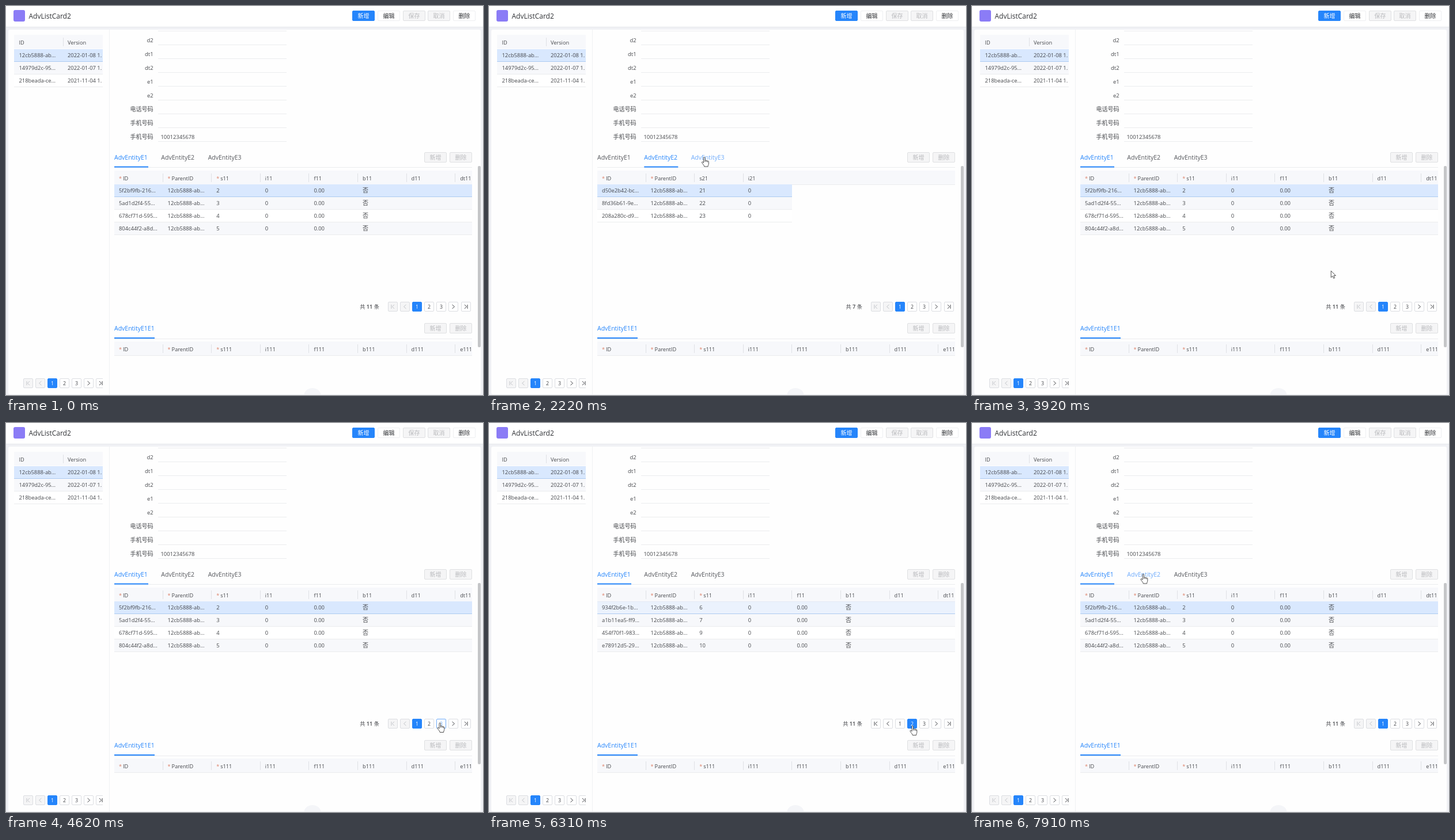
Write an HTML page that moves like this. It is 828 px wide and 676 px high and loops after 8000 ms.

```html
<!DOCTYPE html>
<html>
<head>
<meta charset="utf-8">
<style>
html, body { margin: 0; width: 100%; height: 100%; overflow: hidden; background: #f0f1f5; }
svg { display: block; }
text { font-family: "Open Sans", "Noto Sans CJK SC", "Noto Sans CJK", sans-serif; white-space: pre; }
</style>
</head>
<body>
<svg width="828" height="676" viewBox="0 0 828 676">
  <defs>
    <clipPath id="list"><rect x="14" y="41" width="154" height="634"/></clipPath>
    <clipPath id="grid"><rect x="188" y="280" width="621" height="340"/></clipPath>
    <clipPath id="card"><rect x="4" y="41" width="820" height="634"/></clipPath>
  </defs>
  <g id="back"></g>
  <g id="live"></g>
  <g id="pointer"></g>
</svg>
<script>
const LOOP = 8000, BLUE = '#2585fb', SOFT = '#6eabfb', INK = '#45474b', LINE = '#ebecee', TINT = '#f7f8fb';
const COL = 84.6, TAB_X = [188, 269.3, 350.7], TAB_W = 59;
const $ = id => document.getElementById(id);

const box = (x, y, w, h, fill, more = '') =>
  `<rect x="${x}" y="${y}" width="${w}" height="${h}" fill="${fill}" ${more}/>`;
const text = (x, y, s, size = 9.4, fill = INK, more = '') =>
  `<text x="${x}" y="${y}" font-size="${size}" fill="${fill}" ${more}>${s}</text>`;
const mid = 'text-anchor="middle"', end = 'text-anchor="end"';
const clip = (id, s) => `<g clip-path="url(#${id})">${s}</g>`;

function button(x, y, label, kind) {
  const [fill, edge, ink] = {
    main: [BLUE, BLUE, '#fff'],
    plain: ['#fff', '#eeeff1', '#303236'],
    off: ['#f5f5f6', '#dfe0e2', '#b9babd']
  }[kind];
  return box(x + .5, y + .5, 38, 17, fill, `stroke="${edge}" rx="1.5"`) +
    text(x + 19.5, y + 12.7, label, 10, ink, mid);
}

const selected = (x, y, w, alpha = 1) =>
  box(x, y, w, 22, '#d9e8fe', `opacity="${alpha}"`) + box(x, y + 21, w, 1, '#adcbf1');
const stripe = (x, y, w, odd) =>
  box(x, y, w, 22, odd ? TINT : '#fff') + box(x, y + 21, w, 1, LINE);

// A leading * marks a required column
function header(y, names, endless) {
  let s = box(188, y, 621, 24, TINT) + box(188, y + 24, 621, 1, LINE);
  names.forEach((name, i) => {
    const x = 196 + i * COL, must = name[0] == '*';
    if (must) s += text(x, y + 16.5, '*', 9, '#dd8068');
    s += text(x + (must ? 7 : 0), y + 16.5, must ? name.slice(1) : name, 9.2);
    if (endless || i < names.length - 1) s += box(Math.round(188 + (i + 1) * COL) - 1, y + 5, 1, 15, '#dfe1e5');
  });
  return s;
}

function pager(x, y, count, page, over) {
  const items = ['first', 'prev', ...Array.from({ length: count }, (_, i) => i + 1), 'next', 'last'];
  const shape = { first: 'M-2.5-3.5V3.5M2.5-3.5L-1 0L2.5 3.5', prev: 'M2-3.5L-2 0L2 3.5',
    next: 'M-2-3.5L2 0L-2 3.5', last: 'M2.5-3.5V3.5M-2.5-3.5L1 0L-2.5 3.5' };
  return items.map((item, i) => {
    const cx = Math.round(x + i * 21.1 - .5) + .5, on = item === page, hot = over === item && !on;
    const off = i < 2 ? page == 1 : i > count + 1 && page == count;
    const ink = on ? '#fff' : hot ? SOFT : off ? '#c3c5c9' : INK;
    const edge = on ? BLUE : hot ? SOFT : '#dcdee2';
    return box(cx - 8, y - 8, 16, 16, on ? BLUE : off ? '#f5f5f6' : '#fff', `stroke="${edge}" rx="1.5"`) +
      (shape[item]
        ? `<path transform="translate(${cx} ${y})" d="${shape[item]}" fill="none" stroke="${ink}"/>`
        : text(cx, y + 3.3, item, 8.8, ink, mid));
  }).join('');
}

function backdrop() {
  let s = box(0, 0, 828, 37, '#fff') + box(0, 36, 828, 1, '#e6e7eb') +
    box(13, 7, 20, 20, '#8b7cf6', 'rx="3"') + text(39.5, 21.5, 'AdvListCard2', 12, '#303236') +
    box(4, 41, 820, 634, '#fefefe', 'rx="3"') + box(179, 41, 1, 634, '#f0f1f3');
  ['新增', '编辑', '保存', '取消', '删除'].forEach((b, i) =>
    s += button(Math.round(601 + i * 43.75), 8, b, ['main', 'plain', 'off', 'off', 'plain'][i]));

  let list = box(14, 50, 154, 24, TINT) + box(99, 55, 1, 15, '#dfe1e5') +
    text(22.5, 66.5, 'ID', 9.2) + text(107, 66.5, 'Version', 9.2);
  [['12cb5888-ab...', '2022-01-08 1.'], ['14979d2c-95...', '2022-01-07 1.'], ['218beada-ce...', '2021-11-04 1.']]
    .forEach(([id, version], i) => {
      const y = 75 + i * 22;
      list += (i ? stripe(14, y, 154, i % 2) : selected(14, y, 154)) +
        text(22.5, y + 13.7, id) + text(107, y + 13.7, version);
    });
  s += clip('list', list + pager(38, 655.5, 3, 1));

  s += box(264, 43, 223, 1, LINE);
  ['d2', 'dt1', 'dt2', 'e1', 'e2', '电话号码', '手机号码', '手机号码'].forEach((label, i) =>
    s += text(255.5, 63 + i * 24, label, i < 5 ? 9.4 : 10, INK, end) + box(264, 67 + i * 24, 223, 1, LINE));
  s += text(268.5, 230.5, '10012345678');

  for (const y of [254, 551]) s += button(726, y, '新增', 'off') + button(770, y, '删除', 'off');
  s += box(188, 280, 621, 1, LINE) + box(188, 578, 621, 1, LINE) + box(188, 576, 70, 2, BLUE) +
    text(188, 564.3, 'AdvEntityE1E1', 10.5, BLUE) +
    clip('grid', header(583, ['*ID', '*ParentID', '*s111', 'i111', 'f111', 'b111', 'd111', 'e111'], true)) +
    clip('card', '<ellipse cx="532" cy="676" rx="14.5" ry="12" fill="#f4f5f8"/>') +
    box(819, 278, 5, 315, '#c5c6c8', 'rx="2"');
  return s;
}

// Data sets: head, ids, third column, total, page count
const wide = ['*ID', '*ParentID', '*s11', 'i11', 'f11', 'b11', 'd11', 'dt11'];
const set = (head, ids, keys, total, pages) => ({ head, ids: ids.split(' '), keys: keys.split(' '), total, pages });
const page1 = set(wide, '5f2bf9fb-216 5ad1d2f4-55 678cf71d-595 804c44f2-a8d', '2 3 4 5', 11, 3);
const page2 = set(wide, '934f2b6e-1b a1b11ea5-ff9 454f70f1-983 e78912d5-29', '6 7 9 10', 11, 3);
const page3 = set(wide, '36d95257-bc 55bf5739-a7f f98a0529-59e', '1- 8- 11-', 11, 3);
const second = set(['*ID', '*ParentID', 's21', 'i21'], 'd50e2b42-bc 8fd36b61-9e 208a280c-d9', '21 22 23', 7, 3);
const third = set(['*ID', '*ParentID', 's31', 'i31'],
  '6c56d60f-6a8 6873d733-35 941192e1-0a 12fa6dfc-dec 611cca9c-2a3', '31 32 33 34 35', 6, 2);

const tabs = [[0, 0], [1770, 1], [2520, 2], [3420, 0]];
const pages = [[0, 1], [4880, 3], [6110, 2], [6960, 1]];
const loads = [[-999, page1], [1870, second], [2520, third], [3520, page1], [5110, page3], [6260, page2], [7060, page1]];
const path = [
  [710, 815, 311], [760, 560, 296], [810, 362, 286], [860, 433, 303], [1060, 433, 303], [1620, 297.5, 262.5],
  [1970, 297.5, 262.5], [2220, 373.5, 262.5], [2770, 373.5, 262.5], [3170, 211.5, 262.5],
  [3570, 211.5, 262.5], [4070, 735, 514], [4220, 735, 514], [4470, 756, 521], [4570, 756, 521], [4620, 753, 521],
  [4930, 753, 521], [5180, 752, 555], [5640, 752, 555], [6010, 735, 526], [6460, 735, 526],
  [6610, 728, 539], [6810, 717, 528], [7060, 717, 528], [7260, 618, 438], [7660, 201, 280], [7910, 297, 262.5]
];

const smooth = k => k * k * (3 - 2 * k);
const clamp = k => Math.max(0, Math.min(1, k));
const latest = (list, t) => list.findLastIndex(e => e[0] <= t);

function cursorAt(t) {
  const i = latest(path, t);
  if (i < 0) return null;
  const a = path[i], b = path[i + 1] || a;
  const k = b == a ? 0 : smooth((t - a[0]) / (b[0] - a[0]));
  return [a[1] + (b[1] - a[1]) * k, a[2] + (b[2] - a[2]) * k];
}

function grid(data, alpha) {
  const full = data.head == wide, w = full ? 621 : 338;
  let s = header(286, data.head, full);
  data.ids.forEach((id, i) => {
    const y = 310 + i * 22;
    s += i ? stripe(188, y, w, i % 2) : selected(188, y, w, alpha);
    [id + '...', '12cb5888-ab...', data.keys[i], '0', ...(full ? ['0.00', '否'] : [])].forEach((v, c) =>
      s += text(196 + c * COL, y + 14.2, v, c == 5 ? 10 : 9.4));
  });
  return clip('grid', s);
}

const hand = 'M-1 1.2C-1-.3 1.4-.3 1.4 1.2V6C2 5.2 3.6 5.4 3.8 6.4C4.6 5.7 5.9 6 6 7C7 6.6 7.8 7 7.8 8' +
  'V11.5C7.8 13.5 6.6 14 6.6 16.5H.2C.2 14.5-2 13-4 9.6C-4.4 8.4-3 7.7-2 8.8L-1 10Z';
const arrow = 'M0 0V11.5L2.7 9L4.5 13L6.4 12.2L4.7 8.3H8.2Z';

$('back').innerHTML = backdrop();
let shown = '';

function draw(t) {
  const n = latest(tabs, t), tab = tabs[n][1], before = tabs[Math.max(0, n - 1)][1];
  const page = pages[latest(pages, t)][1];
  const [since, data] = loads[latest(loads, t)];
  const pos = cursorAt(t), [px, py] = pos || [-9, -9];
  const pagerX = 798 - (data.pages + 3) * 21.1;

  const overTab = py > 252 && py < 281 ? TAB_X.findIndex(x => px >= x && px <= x + TAB_W) : -1;
  const slot = (px - pagerX + 8.5) / 21.1;
  const inSlot = py >= 513 && py <= 531 && slot >= 2 && slot < data.pages + 2 && slot % 1 < .81;
  const overPage = inSlot ? Math.floor(slot) - 1 : 0;

  const slide = smooth(clamp((t - tabs[n][0]) / 100));
  const inkX = TAB_X[before] + (TAB_X[tab] - TAB_X[before]) * slide;
  const html = TAB_X.map((x, i) =>
    text(x, 266.8, 'AdvEntityE' + (i + 1), 10.5, i == tab ? BLUE : i == overTab ? SOFT : '#55575c')).join('') +
    box(inkX, 278.6, TAB_W, 2, BLUE) +
    grid(data, clamp((t - since) / 100)) +
    text(pagerX - 23.5, 526.3, `共 <tspan font-weight="600">${data.total}</tspan> 条`, 9.2, INK, end) +
    pager(pagerX, 522.5, data.pages, page, overPage);
  if (html != shown) $('live').innerHTML = shown = html;

  const pointing = overTab >= 0 || overPage;
  $('pointer').innerHTML = pos
    ? `<g transform="translate(${px} ${py})" fill="#fff" stroke="#222" stroke-width=".8" stroke-linejoin="round">` +
      `<path d="${pointing ? hand : arrow}"/>${pointing ? '<path d="M1.4 6V8.5M3.8 6.4V8.5M6 7V9"/>' : ''}</g>`
    : '';
}

function tick() {
  draw(performance.now() % LOOP);
  requestAnimationFrame(tick);
}
tick();
</script>
</body>
</html>
```
